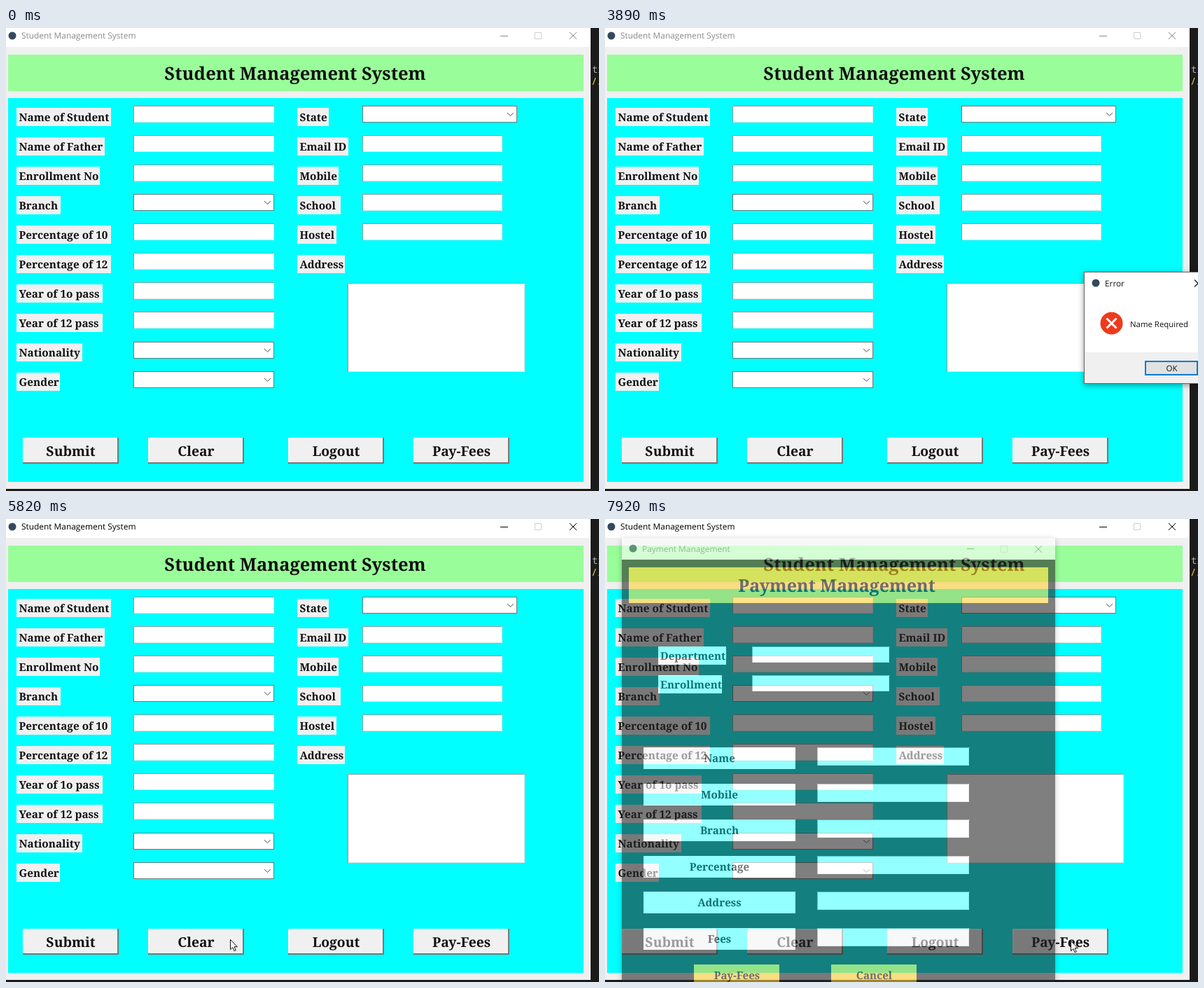
These frames come from a looping animation (847 px wide and 661 px high, 8 s). An HTML page:

```html
<!DOCTYPE html>
<html lang="en">
<head>
<meta charset="utf-8">
<title>Student Management System</title>
<style>
  html, body { margin: 0; width: 100%; height: 100%; overflow: hidden; background: #f0f0f0; }
  svg { display: block; width: 847px; height: 661px; }
  text { white-space: pre; text-rendering: geometricPrecision; }
  .serif { font-family: "Noto Serif", serif; font-weight: 700; fill: #111; }
  .ui { font-family: "Open Sans", sans-serif; }
  .mono { font-family: "Noto Sans Mono", monospace; font-size: 14px; }
  .line { fill: none; stroke-width: 1; }
  #dialog, #payment { filter: drop-shadow(0 2px 4px rgba(0, 0, 0, .4)); }
</style>
</head>
<body>
<svg id="stage" viewBox="0 0 847 661"></svg>
<script>
const LOOP = 8000;
const $ = id => document.getElementById(id);

// Drawing helpers
const rect = (x, y, w, h, fill, extra = '') =>
  `<rect x="${x}" y="${y}" width="${w}" height="${h}" fill="${fill}" ${extra}/>`;
const frame = (x, y, w, h, fill, stroke) =>
  rect(x + .5, y + .5, w - 1, h - 1, fill, `stroke="${stroke}"`);
const path = (d, stroke, extra = '') =>
  `<path class="line" d="${d}" stroke="${stroke}" ${extra}/>`;
const text = (cls, x, y, size, str, extra = '') =>
  `<text class="${cls}" x="${x}" y="${y}" font-size="${size}" ${extra}>${str}</text>`;
const serif = (x, y, size, str) => text('serif', x, y, size, str);
const centred = (x, y, size, str) => text('serif', x, y, size, str, 'text-anchor="middle"');
const cross = (x, y, r) => `M${x - r} ${y - r}l${2 * r} ${2 * r}m0 ${-2 * r}l${-2 * r} ${2 * r}`;
const badge = (x, y) => `<circle cx="${x}" cy="${y}" r="5.5" fill="#34495e"/>`;

const entry = (x, y, w, h) =>
  rect(x, y, w, h, '#fff') +
  path(`M${x + .5} ${y + h}v${-h + .5}h${w}`, '#8e9c9c') +
  path(`M${x + 1} ${y + h - .5}h${w - 1.5}v${1 - h}`, '#e3e3e3');

const combo = (x, y, w) =>
  frame(x, y, w, 24, '#fff', '#6f7a7a') +
  path(`M${x + w - 14} ${y + 10}l4.5 4.5l4.5 -4.5`, '#555', 'stroke-width="1.2"');

const label = (x, y, right, str) =>
  rect(x, y, right - x, 26, '#f0f0f0') + serif(x + 3.5, y + 18.5, 15.3, str);

const face = (x, y, w, h, light, dark) =>
  rect(x, y, w, h, '#f0f0f0') +
  path(`M${x + 1} ${y + h}v${1 - h}h${w - 1}`, light, 'style="stroke-width:2"') +
  path(`M${x} ${y + h - 1}h${w - 1}v${1 - h}`, dark, 'style="stroke-width:2"');

const button = (x, str, id) =>
  `<g>${face(x, 585, 137, 37, '#fff', '#777')}${centred(x + 68.5, 611, 19.3, str)}</g>` +
  `<g id="${id}" visibility="hidden">${face(x, 585, 137, 37, '#777', '#fff')}` +
  `${centred(x + 69.5, 612, 19.3, str)}</g>`;

const mainWindow = () => {
  const left = [['Name of Student', 150], ['Name of Father', 141], ['Enrollment No', 134],
    ['Branch', 78], ['Percentage of 10', 150], ['Percentage of 12', 150],
    ['Year of 1o pass', 138], ['Year of 12 pass', 138], ['Nationality', 109], ['Gender', 77]];
  const right = [['State', 461], ['Email ID', 489], ['Mobile', 475],
    ['School', 478], ['Hostel', 472], ['Address', 484]];
  const combos = ['Branch', 'Nationality', 'Gender'];
  let s = rect(0, 0, 847, 661, '#1b1b1b') + rect(0, 0, 835, 658, '#f0f0f0') +
    rect(0, 0, 835, 27, '#fff') + badge(9, 11) +
    `<g id="caption">${text('ui', 22, 15, 11.9, 'Student Management System', 'fill="currentColor"')}` +
    path('M706 11.5h11', 'currentColor') + path(cross(810, 11, 5), 'currentColor') + '</g>' +
    path('M755.5 6.5h9v9h-9z', '#d0d0d0') +
    text('mono', 837, 64, 14, 'tx', 'fill="#aaa"') +
    text('mono', 836, 81, 14, '//A', 'fill="#e8d44d"') +
    rect(3, 38, 822, 52, '#99fd99') + centred(413, 74, 25.5, 'Student Management System') +
    rect(3, 100, 822, 548, '#0ff');
  left.forEach(([str, end], i) => {
    const y = 111 + 42.1 * i | 0;
    s += label(15, y + 3, end, str) +
      (combos.includes(str) ? combo(182, y + (i > 3 ? 1 : 0), 201) : entry(182, y, 201, 24));
  });
  right.forEach(([str, end], i) => {
    const y = 111 + 42.1 * i | 0;
    s += label(416, y + 3, end, str);
    if (i == 0) s += combo(509, y, 221);
    else if (i < 5) s += entry(509, y, 200, 24);
  });
  return s + entry(488, 364, 253, 127) + button(24, 'Submit', 'submit') +
    button(203, 'Clear', 'clear') + button(403, 'Logout', 'logout') +
    button(582, 'Pay-Fees', 'pay');
};

const errorDialog = () =>
  frame(684, 348, 204, 160, '#fff', '#666') +
  rect(685, 463, 202, 44, '#f0f0f0') + badge(701, 364) +
  text('ui', 714, 369, 11.8, 'Error', 'fill="#111"') +
  rect(829, 349, 46, 30, '#e81123', 'id="hot"') +
  `<g id="shut">${path(cross(847, 364.5, 5), 'currentColor', 'style="stroke-width:1.2"')}</g>` +
  '<circle cx="723.5" cy="421.5" r="16" fill="#ee3a1c"/>' +
  path(cross(723.5, 421.5, 7), '#fff', 'style="stroke-width:3"') +
  text('ui', 750, 427, 11.4, 'Name Required', 'fill="#111"') +
  rect(772, 476, 74, 19, '#e1e1e1', 'stroke="#0078d7" stroke-width="2"') +
  text('ui', 809.5, 490, 11.4, 'OK', 'fill="#111" text-anchor="middle"');

const paymentWindow = () => {
  const gold = '#ffd033';
  let s = rect(24, 27, 619, 640, '#242424') + rect(24, 27, 619, 31, '#fff') + badge(40, 42) +
    text('ui', 53, 47, 11.9, 'Payment Management', 'fill="#888"') +
    path('M517 42.5h10', '#888') + path('M565.5 38.5h9v9h-9z', '#ddd') +
    path(cross(619, 43, 5), '#888') +
    rect(34, 69, 599, 51, gold) + centred(331, 104, 25, 'Payment Management');
  [['Department', 173], ['Enrollment', 167]].forEach(([str, end], i) => {
    const y = 182 + 41 * i;
    s += rect(76, y, end - 76, 26, '#fff') + serif(79, y + 18.5, 15.2, str) + entry(210, y, 196, 23);
  });
  ['Name', 'Mobile', 'Branch', 'Percentage', 'Address', 'Fees'].forEach((str, i) => {
    const y = Math.round(326 + 51.6 * i);
    s += rect(55, y, 217, 31, '#fff') + centred(163.5, y + 20.5, 15.2, str) + entry(303, y, 217, 26);
  });
  [['Pay-Fees', 127], ['Cancel', 323]].forEach(([str, x]) => {
    s += rect(x, 636, 122, 31, gold) + centred(x + 61.5, 657, 15.2, str);
  });
  return s;
};

$('stage').innerHTML = mainWindow() +
  `<g id="dialog">${errorDialog()}</g><g id="payment" opacity=".58">${paymentWindow()}</g>` +
  '<path id="cursor" d="M.5 .5v14.2l3.3-3.1l2.3 5.1l2.2-1l-2.3-5h4.3z" fill="#fff" stroke="#111" stroke-width="1"/>';

// Pointer: [start, end, steps, x0, y0, x1, y1], held between steps
const AWAY = -50;
const still = (t, x, y) => [t, t, 1, x, y, x, y];
const moves = [
  still(0, AWAY, AWAY), still(800, 73, -10), still(870, AWAY, AWAY),
  [1540, 1960, 6, 69, 12, 552, 631], [2030, 2340, 5, 500, 627, 160, 583],
  [2430, 2570, 3, 125, 593, 83, 602],
  [2970, 3120, 3, 150, 615, 270, 640], [3240, 3610, 6, 268, 638, 238, 616],
  still(3770, 520, 540), still(3830, 799, 467), still(3890, AWAY, AWAY),
  still(4070, 842, 383), [4230, 4380, 3, 841, 374, 840, 366],
  [4700, 4940, 4, 760, 390, 419, 476], [5020, 5480, 7, 402, 494, 285, 601],
  [5820, 6150, 5, 320, 600, 450, 598],
  still(7360, 580, 601), still(7460, 665, 602)
];
const pointer = t => {
  const [a, b, n, x0, y0, x1, y1] = moves.findLast(m => m[0] <= t);
  const p = n < 2 ? 1 : Math.min(1, Math.floor((t - a) / (b - a) * (n - 1) + 1e-6) / (n - 1));
  return [Math.round(x0 + (x1 - x0) * p), Math.round(y0 + (y1 - y0) * p)];
};

const show = (id, on) => $(id).setAttribute('visibility', on ? 'visible' : 'hidden');
const within = (t, a, b) => t >= a && t < b;

function draw(t) {
  const [x, y] = pointer(t);
  $('cursor').setAttribute('transform', `translate(${x} ${y})`);
  $('caption').style.color = t < 4700 ? '#8a8a8a' : '#000';

  const fading = within(t, 3120, 3240) || within(t, 4700, 4780);
  const hot = within(t, 4230, 4780);
  $('dialog').style.display = within(t, 3120, 4780) ? '' : 'none';
  $('dialog').setAttribute('opacity', fading ? .42 : 1);
  $('dialog').setAttribute('transform', fading ? 'translate(730 427) scale(.97) translate(-730 -427)' : '');
  $('hot').setAttribute('opacity', hot ? 1 : 0);
  $('shut').style.color = hot ? '#fff' : '#111';

  show('logout', within(t, 6370, 6440));
  show('pay', within(t, 7760, 7840));
  $('payment').style.display = t >= 7920 ? '' : 'none';
}

const start = performance.now();
function tick() {
  draw((performance.now() - start) % LOOP);
  requestAnimationFrame(tick);
}
tick();
</script>
</body>
</html>
```
